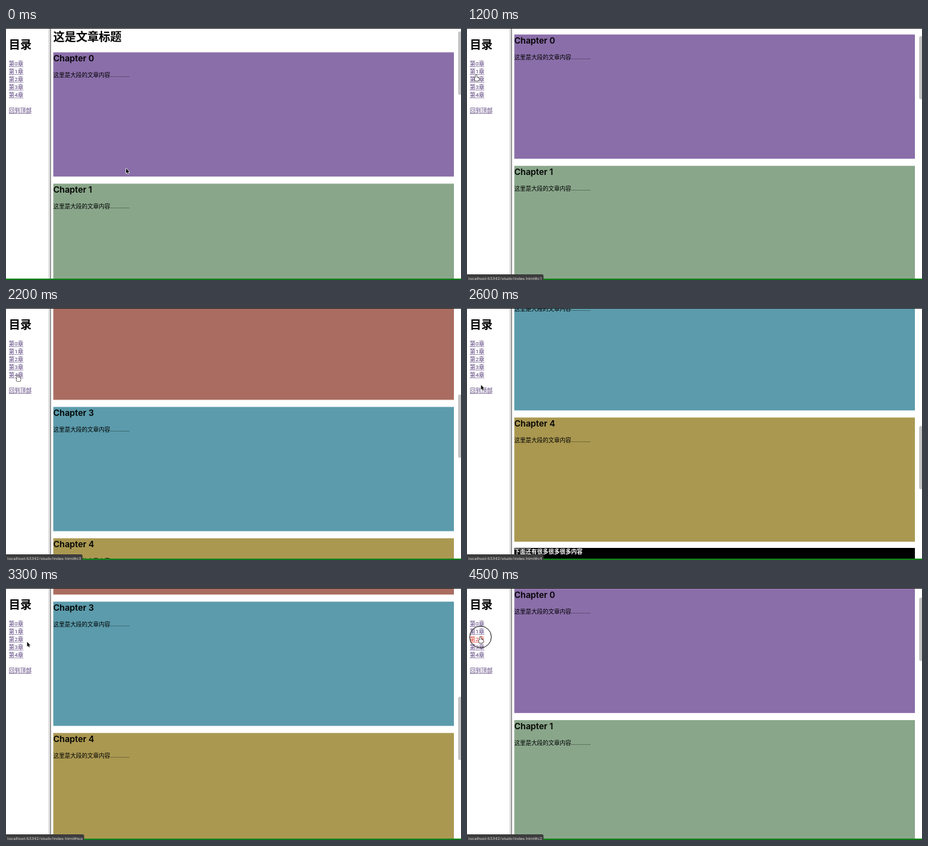
Recreate the animation shown at these times as an HTML page with a canvas. Size 640 by 355 pixels, loop 4.6 s.

```html
<!DOCTYPE html>
<html lang="zh">
<head>
<meta charset="utf-8">
<title>目录</title>
<style>
html, body { margin: 0; width: 100%; height: 100%; overflow: hidden; background: #fff; }
canvas { display: block; width: 640px; height: 355px; }
</style>
</head>
<body>
<canvas id="stage"></canvas>
<script>
const W = 640, H = 355, LOOP = 4600, STEP = 100;
const canvas = document.getElementById('stage');
const dpr = window.devicePixelRatio || 1;
canvas.width = W * dpr;
canvas.height = H * dpr;
const ctx = canvas.getContext('2d');

const CJK = '"Noto Sans CJK SC", "Noto Sans CJK", sans-serif';
const BODY = 'Roboto, ' + CJK;
const HEAD = 'Inter, ' + CJK;
const COLORS = ['#8a6ea9', '#89a68a', '#aa6c60', '#5b9bab', '#aa9851'];
const chapterTop = i => 34 + 185 * i;

const LINKS = COLORS.map((_, i) => (
  { text: `第${i}章`, y: 50 + 11 * i, right: 25, hash: 'c' + i, goal: chapterTop(i), time: 400 }));
LINKS.push({ text: '回到顶部', y: 116, right: 36, hash: 'top', goal: 0, time: 630 });

// Pointer stops: the moment it leaves, and the link it clicks there, if any
const stop = (at, x, y, link) => ({ at, x, y, link: LINKS[link] });
const STOPS = [
  stop(0, 169, 198),
  stop(934, 14, 52, 0),
  stop(1270, 13, 66, 1),
  stop(1650, 15, 73, 2),
  stop(2070, 16, 86, 3),
  stop(2496, 17, 96, 4),
  stop(3088, 22, 119, 5),
  stop(3400, 30, 74),
  stop(4137, 17, 55, 0),
  stop(4540, 19, 69, 2)
];
const CLICKS = STOPS.filter(s => s.link);

const ease = x => x * x * (3 - 2 * x);
const progress = (t, start, time) => ease(Math.max(0, Math.min(1, (t - start) / time)));

function scrollAt(t) {
  return CLICKS.reduce((s, { at, link }) => s + (link.goal - s) * progress(t, at, link.time), 0);
}

function pointerAt(t) {
  let { x, y } = STOPS[0];
  STOPS.slice(1).forEach((to, i) => {
    const from = STOPS[i];
    const k = progress(t, from.at, 150 + 2 * Math.hypot(to.x - from.x, to.y - from.y));
    x += (to.x - x) * k;
    y += (to.y - y) * k;
  });
  return { x, y };
}

function hovered(t) {
  const { x, y } = pointerAt(t);
  return LINKS.find(l => x >= 4 && x <= l.right && Math.abs(y - l.y) <= 5.5);
}

// The status bubble lags one step and keeps the last link
function statusAt(t) {
  for (let u = t - STEP; u >= 0; u -= STEP) {
    const link = hovered(u);
    if (link) return link.hash;
  }
  return '';
}

function rect(x, y, w, h, color) {
  ctx.fillStyle = color;
  ctx.fillRect(x, y, w, h);
}

function rounded(x, y, w, h, r, color) {
  ctx.fillStyle = color;
  ctx.beginPath();
  ctx.roundRect(x, y, w, h, r);
  ctx.fill();
}

function text(str, x, y, font, color = '#000') {
  ctx.font = font;
  ctx.fillStyle = color;
  ctx.fillText(str, x, y);
}

function drawArticle(s) {
  ctx.save();
  ctx.translate(0, -s);
  text('这是文章标题', 66.5, 18.2, 'bold 16px ' + CJK);
  COLORS.forEach((color, i) => {
    const y = chapterTop(i);
    rect(66.5, y + 0.3, 563.5, 175, color);
    text('Chapter ' + i, 66.5, y + 12.7, '600 12px ' + HEAD);
    text('这里是大段的文章内容' + '.'.repeat(13), 66.5, y + 34.8, '8px ' + BODY);
  });
  rect(66.5, 958, 563.5, 420, '#000');
  text('下面还有很多很多很多内容', 66.5, 966.2, 'bold 8px ' + CJK, '#fff');
  ctx.restore();
  rounded(636, 5 + s * 0.26, 5, 89, 2, '#c4c4c4');
}

function drawMenu(active) {
  text('目录', 4, 29, 'bold 16px ' + CJK);
  LINKS.forEach(link => {
    const color = link === active ? '#e03528' : '#573f7c';
    text(link.text, 4, link.y + 3, '8px ' + BODY, color);
    rect(4, link.y + 4, ctx.measureText(link.text).width, 0.5, color);
  });
  ['#c8c8c8', '#eee', '#777', '#ddd'].forEach((color, i) => rect(60 + i, 1, 1, H, color));
}

function drawStatus(hash) {
  if (!hash) return;
  const str = 'localhost:63342/study/index.html#' + hash;
  ctx.font = '6.2px ' + BODY;
  rounded(-4, 347, ctx.measureText(str).width + 8, 12, 2, '#3d3d3d');
  text(str, 2, 354.6, ctx.font, '#d2d2d2');
}

function drawPointer({ x, y }, hand) {
  ctx.save();
  ctx.translate(x, y);
  ctx.lineJoin = 'round';
  ctx.lineWidth = 1.2;
  ctx.strokeStyle = hand ? '#222' : '#fff';
  ctx.fillStyle = hand ? '#fff' : '#000';
  ctx.beginPath();
  if (hand) {
    ctx.roundRect(-0.8, 0, 1.5, 5, 0.7);
    ctx.roundRect(-2.2, 3.4, 6, 5.2, 1.8);
  } else {
    [[0, 0], [0, 6.6], [1.5, 5.3], [2.5, 7.7], [3.6, 7.2], [2.6, 4.9], [4.6, 4.8]]
      .forEach(p => ctx.lineTo(...p));
    ctx.closePath();
  }
  ctx.stroke();
  ctx.fill();
  ctx.restore();
}

function drawRing({ x, y }) {
  ctx.beginPath();
  ctx.arc(x, y, 15.3, 0, Math.PI * 2);
  ctx.lineWidth = 1;
  ctx.strokeStyle = '#222';
  ctx.stroke();
}

function draw(t) {
  ctx.setTransform(dpr, 0, 0, dpr, 0, 0);
  rect(0, 0, W, H, '#fff');
  const click = CLICKS.find(c => t >= c.at - 50 && t < c.at + 50);
  const pointer = pointerAt(t);
  drawArticle(scrollAt(t));
  drawMenu(click && click.link);
  rect(0, 0, W, 1, '#2b2b2b');
  rect(0, 353, W, 2, '#14801c');
  drawStatus(statusAt(t));
  drawPointer(pointer, hovered(t));
  if (click) drawRing(pointer);
}

const began = performance.now();
function tick() {
  const t = (performance.now() - began) % LOOP;
  draw(Math.floor(t / STEP) * STEP);
  requestAnimationFrame(tick);
}
tick();
</script>
</body>
</html>
```
